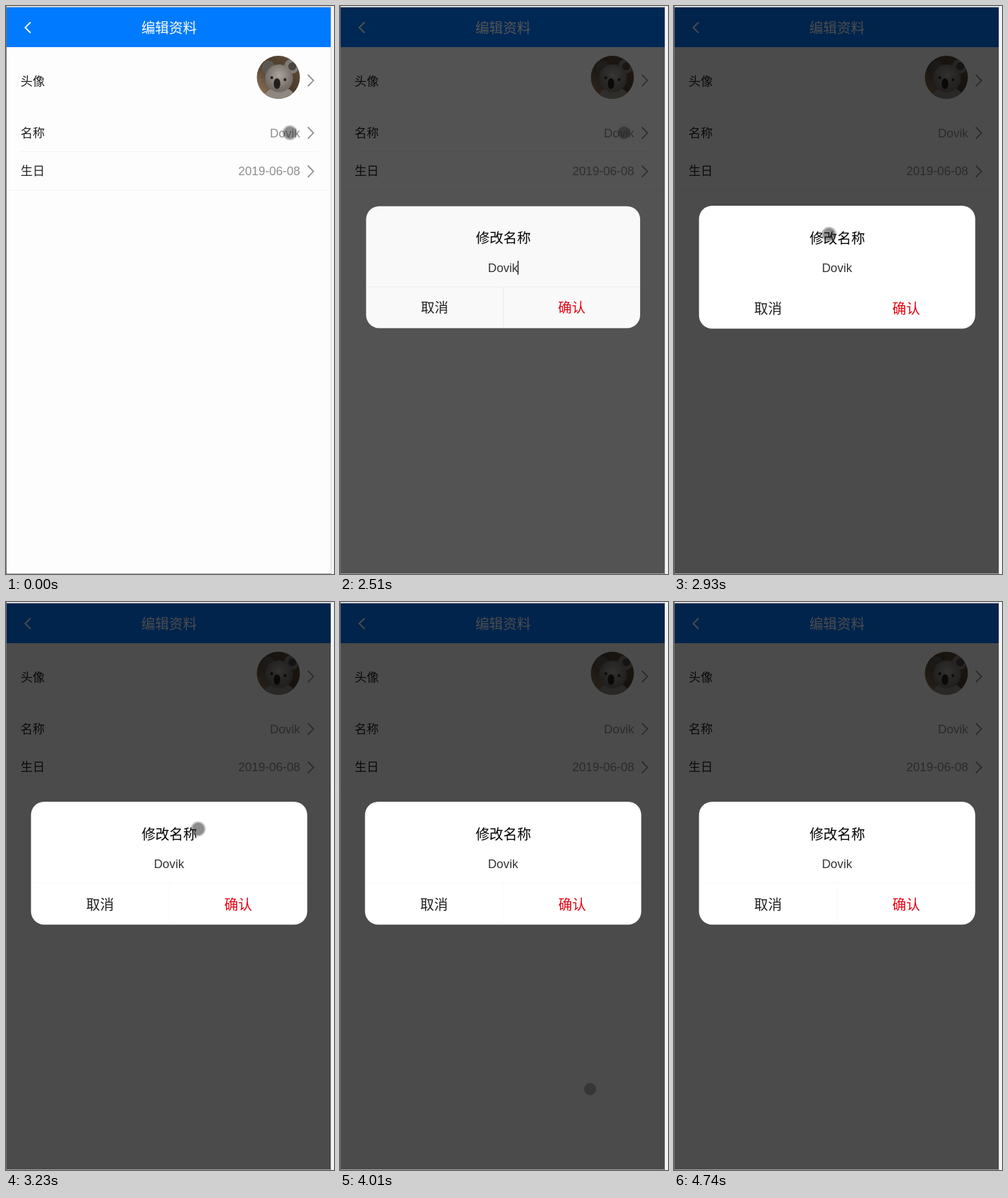
These frames come from a looping animation (495 px wide and 856 px high, 4900 ms). An HTML page:

```html
<!DOCTYPE html>
<html lang="zh">
<head>
<meta charset="utf-8">
<title>编辑资料</title>
<style>
  html, body { margin: 0; width: 100%; height: 100%; overflow: hidden; background: #f4f4f4; }
  svg { display: block; width: 495px; height: 856px; }
  text { font: 18.3px Arial, "Liberation Sans", "Noto Sans CJK SC", "Noto Sans CJK", sans-serif; }
  .big { font-size: 20.9px; }
  .mid { text-anchor: middle; }
  .value { fill: #8f8f8f; text-anchor: end; }
  .arrow { fill: none; stroke: #8f8f8f; stroke-width: 1.8; }
</style>
</head>
<body>
<svg viewBox="0 0 495 856">
  <defs>
    <clipPath id="page"><rect x="1" y="2" width="489" height="853"/></clipPath>
    <clipPath id="round"><circle cx="411" cy="107.5" r="32.5"/></clipPath>
    <linearGradient id="wood" x1="0" y1="1" x2="1" y2="0">
      <stop offset="0" stop-color="#9b8365"/>
      <stop offset=".5" stop-color="#4a3a2b"/>
      <stop offset="1" stop-color="#66503b"/>
    </linearGradient>
    <radialGradient id="fur" cy=".4">
      <stop offset="0" stop-color="#aaa49d"/>
      <stop offset="1" stop-color="#736c66"/>
    </radialGradient>
  </defs>

  <rect width="495" height="856" fill="#f4f4f4"/>
  <rect width="491" height="856" fill="#d6d6d6"/>
  <rect y="855" width="491" height="1" fill="#a6a6a6"/>
  <rect width="1" height="856" fill="#757575"/>

  <g clip-path="url(#page)">
    <rect width="490" height="856" fill="#fdfdfd"/>
    <rect width="490" height="62" fill="#007aff"/>
    <path d="M37 24.5L29 32.5L37 40.5" fill="none" stroke="#fff" stroke-width="2"/>
    <text class="big mid" x="246" y="39.8" fill="#fff">编辑资料</text>

    <rect id="press" y="163" width="490" height="57" fill="#eef0f3"/>
    <path d="M22 219.5H472M0 277.5H490" stroke="#f2f2f2"/>
    <g fill="#222">
      <text x="22" y="119.8">头像</text>
      <text x="22" y="198.4">名称</text>
      <text x="22" y="255.4">生日</text>
    </g>
    <text class="value" x="444" y="198">Dovik</text>
    <text class="value" x="444" y="255.3">2019-06-08</text>
    <path class="arrow" d="M455.5 103.5L464 112.3L455.5 121M455.5 182.5L464 191.3L455.5 200M455.5 240.5L464 249.3L455.5 258"/>

    <g clip-path="url(#round)">
      <rect x="378" y="74" width="66" height="67" fill="url(#wood)"/>
      <ellipse cx="413" cy="138" rx="23" ry="16" fill="#8f8881"/>
      <ellipse cx="396" cy="93" rx="10" ry="11" fill="#5d5751"/>
      <ellipse cx="431" cy="91" rx="11" ry="11" fill="#817b75"/>
      <ellipse cx="432" cy="91" rx="6" ry="6" fill="#4b443e"/>
      <ellipse cx="412" cy="109" rx="21" ry="21" fill="url(#fur)"/>
      <ellipse cx="409" cy="117" rx="5" ry="8" fill="#211e1c"/>
      <circle cx="401" cy="108" r="2.2" fill="#292421"/>
      <circle cx="421" cy="111" r="2.2" fill="#292421"/>
    </g>

    <rect id="shade" width="490" height="856"/>

    <g id="dialog">
      <rect x="37.7" y="301" width="416.9" height="185.3" rx="20" fill="#fff"/>
      <path id="rules" d="M38 423.5H454M246.5 424V486"/>
      <text class="big mid" x="246.5" y="357">修改名称</text>
      <text class="mid" x="246" y="401" fill="#333">Dovik</text>
      <rect id="caret" x="268" y="384" height="21" fill="#333"/>
      <text class="big mid" x="142" y="462.7" fill="#222">取消</text>
      <text class="big mid" x="350.5" y="462.7" fill="#e60012">确认</text>
    </g>

    <g id="touch">
      <circle r="11.3" fill="#4c4c4c" fill-opacity=".34"/>
      <circle r="9.4" fill="#fff" fill-opacity="0"/>
      <circle r="9.2" fill="#000" fill-opacity=".27"/>
    </g>
  </g>
</svg>
<script>
const LOOP = 4900;
const el = id => document.getElementById(id);

// Screen updates are discrete: each entry holds until the next one.
const opening = [
  [0, { shade: 0, scale: 1, alpha: 0 }],
  [2390, { shade: .393, scale: .873, alpha: .58, pressed: true }],
  [2510, { shade: .67, scale: .992, alpha: .97, rule: "#f0f0f0" }],
  [2660, { shade: .703, scale: 1, alpha: 1 }]
];
const touches = [
  [0, [428.5, 191]],
  [2810, [330, 266]],
  [2930, [234, 344]],
  [3080, [213.5, 498]],
  [3230, [290, 342]],
  [3380, [218.5, 443.5]],
  [3500, [268, 408]],
  [3620, [292.5, 390]],
  [3860, [289.5, 390]],
  [4010, [377.5, 734]],
  [4160, [409.5, 784.5]],
  [4310, null]
];
const blinks = [[0, true], [2930, false], [3380, true], [3860, false], [4310, true], [4740, false]];

const at = (steps, t) => steps.findLast(s => s[0] <= t)[1];

function draw(t) {
  const view = at(opening, t);
  el("shade").setAttribute("opacity", view.shade);
  el("press").setAttribute("opacity", view.pressed ? 1 : 0);
  el("dialog").setAttribute("opacity", view.alpha);
  el("dialog").setAttribute("transform",
    `translate(246.3 393.7) scale(${view.scale}) translate(-246.3 -393.7)`);
  el("rules").setAttribute("stroke", view.rule || (t < 3230 ? "#fff" : "#fafafa"));

  el("caret").setAttribute("opacity", at(blinks, t) ? 1 : 0);
  el("caret").setAttribute("width", t < 2660 ? 1.7 : 1);

  const spot = at(touches, t);
  el("touch").setAttribute("opacity", spot ? 1 : 0);
  if (spot) el("touch").setAttribute("transform", `translate(${spot})`);
}

const start = performance.now();
function tick(now) {
  draw(Math.max(0, now - start) % LOOP);
  requestAnimationFrame(tick);
}
draw(0);
requestAnimationFrame(tick);
</script>
</body>
</html>
```
